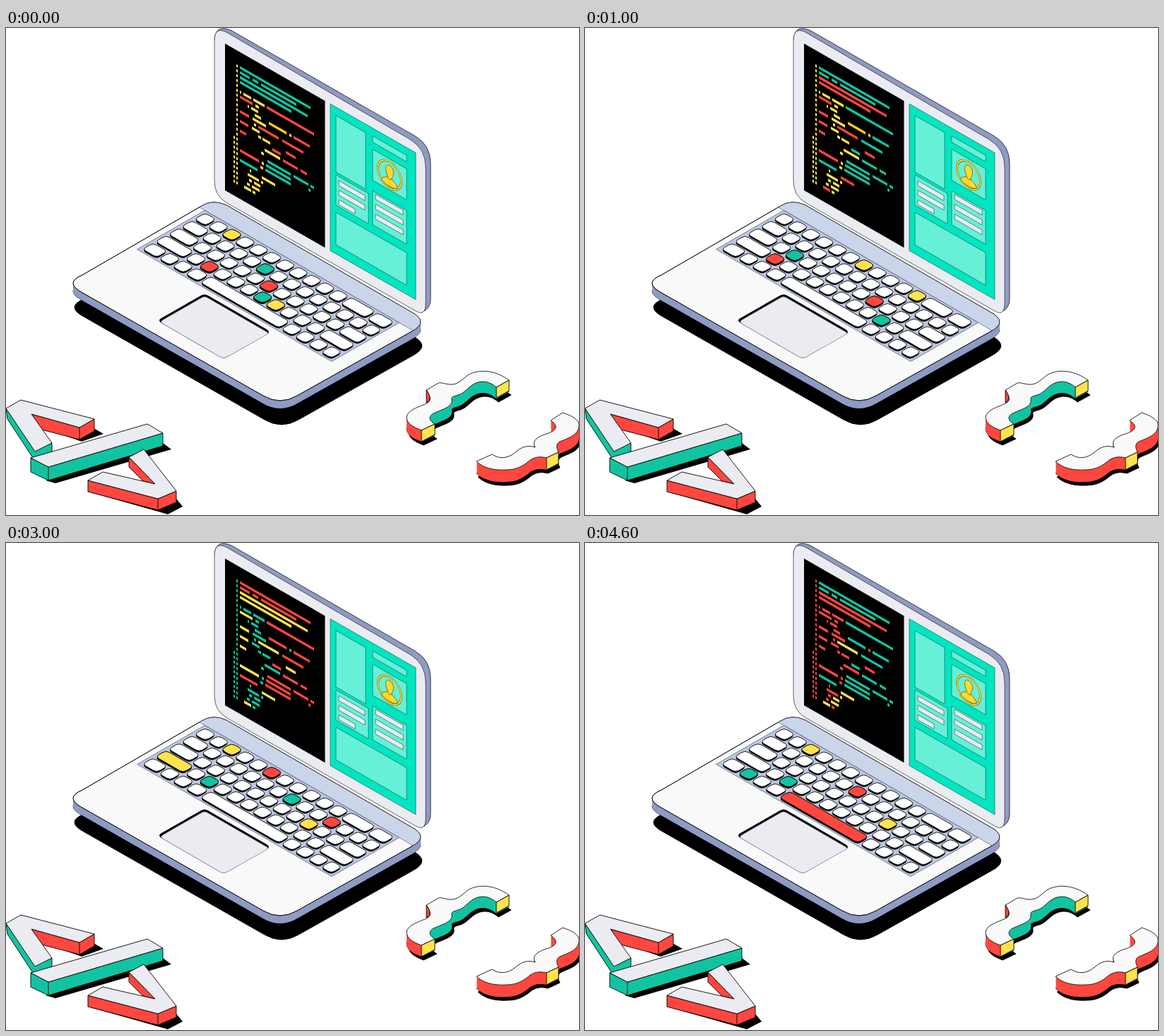
Write an HTML page that moves like this. It is 811 px wide and 690 px high and loops after 5000 ms.

```html
<!DOCTYPE html>
<html lang="en">
<head>
<meta charset="utf-8">
<title>Isometric laptop</title>
<style>
  html, body { margin: 0; width: 100%; height: 100%; overflow: hidden; background: #fff; }
  svg { display: block; width: 811px; height: 690px; }
  .ink { stroke: #000; stroke-width: .9; stroke-linejoin: round; }
  .ink * { vector-effect: non-scaling-stroke; }
  .thin { stroke: #17604f; stroke-width: .6; }
  .phase { visibility: hidden; animation: show 5s step-end infinite; }
  @keyframes show { 0% { visibility: visible; } 20%, 100% { visibility: hidden; } }
</style>
</head>
<body>
<svg id="stage" viewBox="0 0 811 690">
  <defs>
    <linearGradient id="braceSide" gradientUnits="userSpaceOnUse" x1="588" x2="589" y1="0" y2="0">
      <stop offset="0" stop-color="#ff473f"/><stop offset="1" stop-color="#11c4a1"/>
    </linearGradient>
    <clipPath id="deckClip"><path id="deckShape"/></clipPath>
  </defs>

  <g id="base"></g>
  <g clip-path="url(#deckClip)">
    <path d="M250 241L281 258 580 431 640 420 560 330 290 220Z" fill="#cbd5ea" stroke="#56607f" stroke-width=".7"/>
  </g>
  <path id="deckLine" fill="none" stroke="#000" stroke-width=".7"/>

  <g id="keyboard" class="ink" transform="matrix(18.8 10.85 -18.4 10.6 282 271)">
    <rect x="-.6" y="-.57" width="14.65" height="5.2" fill="#bcc6e0" stroke="#4d5675" stroke-width=".7"/>
  </g>

  <path d="M220 411L276 379Q281 376 286 379L369 427Q375 431 369 434L313 466Q308 469 303 466L220 418Q214 414 220 411Z"/>
  <path d="M223 413L277 382Q281 379.500 285 382L368 430Q373 432 368 435L313 466Q308 469 303 466L222 419Q217 416 223 413Z" fill="#ebebf2" stroke="#666d85" stroke-width=".6"/>

  <g class="ink">
    <path d="M295 16Q297 -6 319 3.500L579 153Q601 166 601 192V384Q601 398 588 403L560 380Z" fill="#8f9bc4" stroke-width=".7"/>
    <path d="M295 18Q295 -3 313 6.500L572 158Q594 171 594 198V390Q594 409 580 401L313 248Q295 238 295 217Z" fill="#ebebf2" stroke-width=".6"/>
  </g>

  <g id="screen" transform="matrix(1 .5735 0 1 310 22)">
    <rect width="141.500" height="208"/>
    <g class="thin">
      <rect x="149" width="121" height="208" fill="#00e6c0"/>
      <g id="panels" fill="#66f0d8"></g>
      <g id="bars" fill="#ebebf2"></g>
    </g>
    <g fill="none">
      <ellipse cx="233" cy="52.500" rx="16.500" ry="18.500" stroke="#5c5a18" stroke-width="2.800"/>
      <ellipse cx="233" cy="52.500" rx="16.500" ry="18.500" stroke="#ffd92e" stroke-width="1.800"/>
    </g>
    <g fill="#ffd92e" stroke="#5c5a18" stroke-width=".7">
      <path d="M222 66C222 59 229 59 230.500 56H235.500C237 59 244 59 244 66Q233 72 222 66Z"/>
      <path d="M227.500 46C227.500 37 238.500 37 238.500 46C238.500 52 236 54 235.500 58Q233 60 230.500 58C230 54 227.500 52 227.500 46Z"/>
    </g>
    <g id="code"></g>
  </g>

  <g id="tags">
    <path d="M52 566L124 567 138 575 107 586Z"/>
    <path d="M56 641L222 588 234 597 70 645Z"/>
    <path d="M120 658L241 667 250 678 229 689Z"/>
    <g class="ink" stroke-width=".8">
      <path d="M36 547L104 566 125 554V571L104 583 50 569Z" fill="#ff473f"/>
      <path d="M104 566V583" fill="none"/>
      <path d="M0 539L41 598 65 588V601L38 609 2 554Z" fill="#11c4a1"/>
      <path d="M0 539L21 527 125 554 104 566 36 547 65 588 41 600Z" fill="#ebebf2"/>
      <path d="M35 609L60 622 222 574V592L60 641 35 629Z" fill="#11c4a1"/>
      <path d="M60 622V641" fill="none"/>
      <path d="M35 609L200 561 222 574 60 622Z" fill="#ebebf2"/>
      <path d="M174 608V622L194 642 211 646Z" fill="#ff473f"/>
      <path d="M116 641L215 667 241 656V672L215 683 116 657Z" fill="#ff473f"/>
      <path d="M215 667V683" fill="none"/>
      <path d="M116 641L137 629 211 646 174 608 195 597 241 656 215 667Z" fill="#ebebf2"/>
    </g>
  </g>

  <g id="braces"></g>
</svg>

<script>
const $ = id => document.getElementById(id);

function add(parent, tag, attrs) {
  const el = document.createElementNS('http://www.w3.org/2000/svg', tag);
  for (const name in attrs) el.setAttribute(name, attrs[name]);
  return parent.appendChild(el);
}

const rect = (parent, x, y, width, height, extra) =>
  add(parent, 'rect', { x, y, width, height, ...extra });

// Solid block: shadow, side walls stacked downwards, then the top face.
function block(parent, d, { depth, side, top, shadow }) {
  const g = add(parent, 'g', { class: 'ink' });
  add(g, 'path', { d, transform: `translate(${shadow})` });
  add(g, 'path', { d, fill: side, transform: `translate(0 ${depth})` });
  for (let y = depth; y >= 0; y--)
    add(g, 'path', { d, fill: side, stroke: 'none', transform: `translate(0 ${y})` });
  add(g, 'path', { d, fill: top, 'stroke-width': .8 });
  return g;
}

// Laptop body
const deck = 'M108 350L277 252Q293 242 312 251L573 402Q600 416 574 430L412 521Q388 535 364 521L108 375Q82 361 108 350Z';
block($('base'), deck, { depth: 11, side: '#8f9bc4', top: '#f9f9f9', shadow: '2 34' });
$('deckShape').setAttribute('d', deck);
$('deckLine').setAttribute('d', deck);

// Keyboard, measured in key units
const ones = n => Array(n).fill(1);
const keyRows = [
  [...ones(11), 2, 1.4],
  [1.5, ...ones(12), .95],
  [1.75, ...ones(11), 1.65],
  [2.25, ...ones(10), 2.15],
  [1.25, 1, 1, 1.1, 6.1, 1, 1, 1, .95]
];

function drawKey(parent, row, index, fill) {
  const widths = keyRows[row];
  const x = widths.slice(0, index).reduce((a, b) => a + b, -.5) + .09;
  const w = widths[index] - .18;
  const y = row - .41;
  rect(parent, x + .08, y + .1, w, .82, { rx: .25, 'stroke-width': .5 });
  rect(parent, x, y, w, .82, { rx: .25, fill });
}

keyRows.forEach((widths, row) =>
  widths.forEach((w, index) => drawKey($('keyboard'), row, index, '#fff')));

const ink = { G: '#11c4a1', R: '#ff473f', Y: '#ffe34d', O: '#ffcc0d' };
const litKeys = [
  'Y0.2 R3.2 G1.5 R2.6 G3.6 Y3.7',
  'Y0.6 Y0.10 R3.1 G2.2 R2.8 G3.9',
  'Y0.2 R2.4 G3.4 R0.9 Y2.9 G3.9',
  'Y0.2 Y3.0 R0.5 G3.2 G1.7 Y2.9 R1.10',
  'Y0.2 G4.1 G3.2 R1.6 Y2.9 R4.4'
];
litKeys.forEach((keys, i) => {
  const g = add($('keyboard'), 'g', { class: 'phase', style: `animation-delay:${i - 5}s` });
  for (const key of keys.split(' ')) {
    const [row, index] = key.slice(1).split('.').map(Number);
    drawKey(g, row, index, ink[key[0]]);
  }
});

// Web page preview
[[157, 12, 42, 80], [157, 96, 46, 43], [209, 11, 48, 9], [209, 30, 48, 44],
 [209, 89, 48, 48], [157, 149, 100, 46]].forEach(p => rect($('panels'), ...p));
[[161, 102, 37], [161, 115.5, 37], [161, 129, 23], [213, 91.5, 39], [213, 105.5, 39], [213, 119.5, 39]]
  .forEach(([x, y, w]) => rect($('bars'), x, y, w, 7));

// Code: each token has a colour group and a span; each group has one colour per second.
const groups = {
  a: 'GGORG', b: 'GRRYR', c: 'RGORG', d: 'YYGGR',
  e: 'RRRYR', g: 'YRRYY', h: 'OOORG', k: 'RRRYY', m: 'YYGGY'
};
const lines = [
  'a0-100', 'a0-14 a18-26 a30-80', 'b0-96', 'b0-73', '',
  'd0-2 d5-16 d19-35 c38-105', 'e0-18 d22-27', 'd11-13 d16-26', 'd21-30 h41-66 d70-73 c76-99',
  'e0-13 d18-37', 'd20-23 k26-55 c60-90', 'e0-12 d17-28', 'd26-30 d32-43 e65-79',
  'e0-9 c46-58', 'd35-57 c61-82 c86-95', 'd30-34', 'a39-72 a76-97 a100-105',
  'e0-27 d31-34 a37-72 a97-100', 'd29-33 a36-72', 'a0-25',
  'd14-16 g31-50', 'd11-27 m30-33', 'd13-17 m20-29', 'd10-14 m17-28', 'g6-16 d18-22'
];
const pitch = 6.9;
const token = (group, x, row, w, h = 3.8) =>
  rect($('code'), x + 21, 20 + row * pitch, w, h, { class: 'tok-' + group });

lines.forEach((line, row) => {
  token('d', -5, row, 2, 4);
  if (row > 14) token('d', -9, row, 2, 4);
  for (const [, group, from, to] of line.matchAll(/(\w)(\d+)-(\d+)/g))
    token(group, +from, row, to - from);
});

document.head.appendChild(document.createElement('style')).textContent =
  Object.entries(groups).map(([name, seq]) => {
    const steps = [...seq].map((c, i) => `${i * 20}%{fill:${ink[c]}}`).join('');
    return `@keyframes tok-${name}{${steps}100%{fill:${ink[seq[0]]}}}
      .tok-${name}{animation:tok-${name} 5s step-end infinite}`;
  }).join('\n');

// Curly braces
const face = (g, d, fill) => add(g, 'path', { d, fill });

const open = block($('braces'),
  'M712 499C690 483 668 484 655 491C645 498 640 506 628 505C620 504 616 502 612 503L595 513' +
  'C600 522 603 526 597 531C588 536 569 540 567 551C567 560 575 565 588 570L607 561' +
  'C598 556 598 550 605 546C618 540 632 537 631 527C630 523 632 522 640 520' +
  'C650 517 655 507 665 503C675 499 685 501 694 509Z',
  { depth: 16, side: 'url(#braceSide)', top: '#f9f9f9', shadow: '3 21' });
face(open, 'M595 513V531C602 527 601 521 595 513Z', '#ff473f');
face(open, 'M694 509L712 499V514L694 524Z', '#ffe34d');
face(open, 'M588 570L607 561V576L588 586Z', '#ffe34d');

const close = block($('braces'),
  'M788 545C805 551 811 556 811 563C811 577 795 581 784 586C778 589 779 595 782 601L765 609' +
  'C757 607 750 607 742 612C735 618 725 626 708 626C690 627 675 623 666 614L688 604' +
  'C698 611 710 610 720 602C728 595 736 590 749 594C743 584 755 578 765 575C778 571 784 565 771 556Z',
  { depth: 17, side: '#ff473f', top: '#f9f9f9', shadow: '2 22' });
face(close, 'M765 609L782 601V617L765 626Z', '#ffe34d');
</script>
</body>
</html>
```
